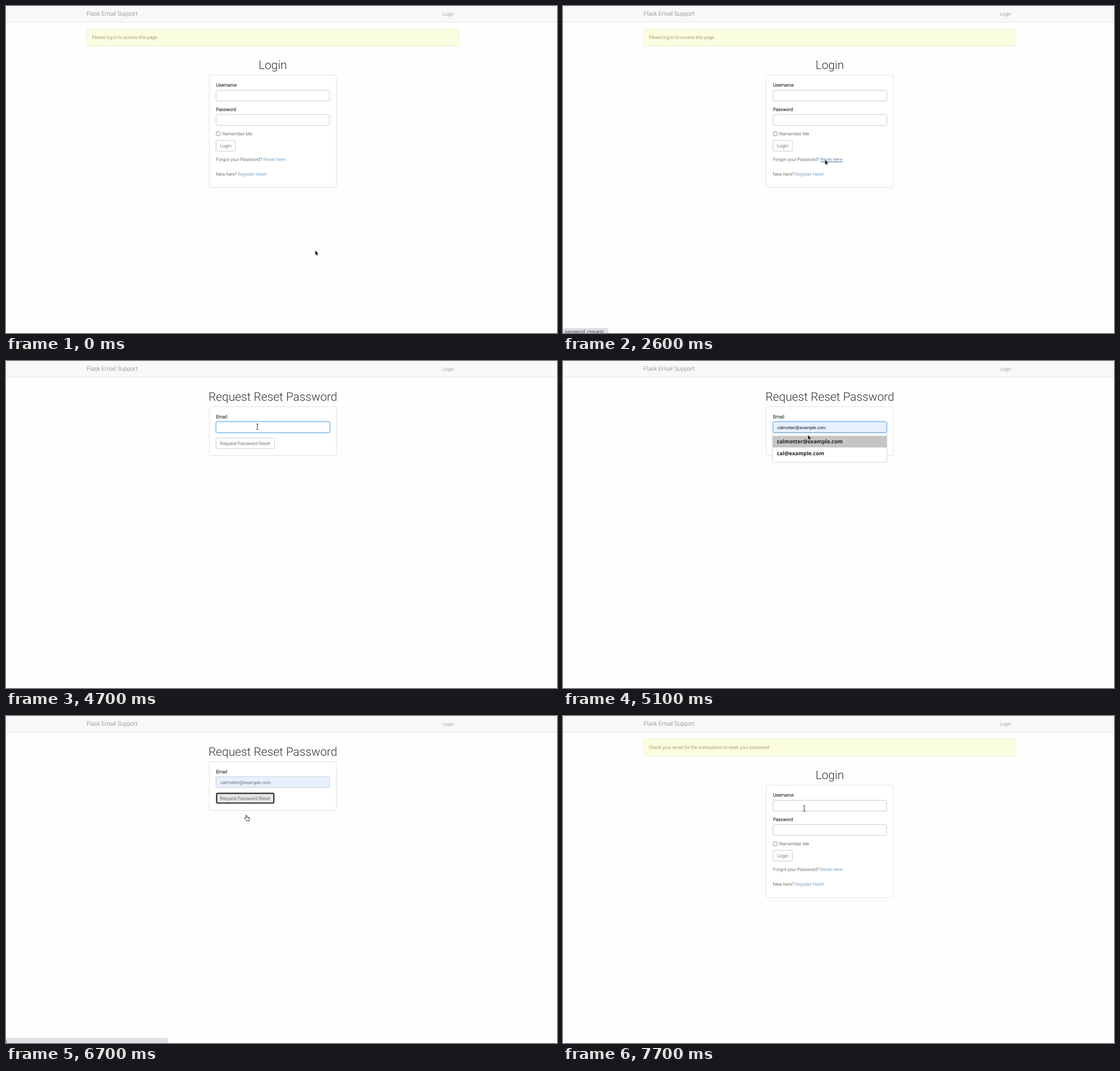
An HTML page that plays this animation: 972 px wide and 576 px high, repeating every 8000 ms.

```html
<!DOCTYPE html>
<html lang="en">
<head>
<meta charset="utf-8">
<title>Password reset</title>
<style>
html, body { margin: 0; width: 100%; height: 100%; overflow: hidden; background: #fefefe; }
svg { display: block; width: 972px; height: 576px; }
text { font: 300 8.08px Roboto, sans-serif; fill: #333; text-rendering: geometricPrecision; white-space: pre; }
.nav { fill: #777; }
.brand { font-size: 10.38px; }
.title { font-size: 20.76px; text-anchor: middle; }
.label { stroke: #333; stroke-width: .3px; }
.note { fill: #8a6d3b; }
.link { fill: #337ab7; }
.link.hover { fill: #23527c; text-decoration: underline; }
.mid { text-anchor: middle; }
.preview { font: 7.69px "Liberation Sans", Arial, sans-serif; fill: #111; }
.option { font: 600 9.3px "Noto Sans", sans-serif; fill: #222; }
.status { font: 8px "Noto Sans", sans-serif; fill: #3c4043; }
.panel { fill: #fff; stroke: #e2e2e2; }
.field, .button { fill: #fff; stroke: #ccc; }
.button.hover { fill: #e6e6e6; stroke: #adadad; }
.autofill { fill: #e8f0fe; }
.focus { stroke: #66afe9; filter: drop-shadow(0 0 1.7px rgba(102, 175, 233, .75)); }
.bar { fill: #dee1e6; }
.menu { fill: #fff; filter: drop-shadow(0 .7px 1px rgba(0, 0, 0, .4)); }
</style>
</head>
<body>
<svg viewBox="0 0 972 576">
  <rect width="972" height="28" fill="#f8f8f8"/>
  <path d="M0 28.5H972" stroke="#e7e7e7"/>
  <text class="nav brand" x="142" y="17.4">Flask Email Support</text>
  <text class="nav" x="770.8" y="17">Login</text>

  <g data-on="0-3000 6900-8000">
    <rect x="142.5" y="40.5" width="656.5" height="30" rx="2" fill="#fafde0" stroke="#f0f2cf"/>
    <text class="note" x="151.5" y="58.4" data-on="0-3000">Please log in to access this page.</text>
    <text class="note" x="151.5" y="58.4" data-on="6900-8000">Check your email for the instructions to reset your password</text>
    <text class="title" x="470.6" y="111.3">Login</text>
    <rect class="panel" x="358.5" y="122" width="224.3" height="197.8" rx="2"/>
    <text class="label" x="370.5" y="142.4">Username</text>
    <rect class="field" x="370.5" y="148.5" width="200.5" height="19" rx="2"/>
    <text class="label" x="370.5" y="185">Password</text>
    <rect class="field" x="370.5" y="191.2" width="200.5" height="19" rx="2"/>
    <rect x="371" y="221.7" width="6.8" height="6.8" rx="1.3" fill="#fff" stroke="#767676" stroke-width=".8"/>
    <text x="381.8" y="228">Remember Me</text>
    <rect class="button" x="370.5" y="236.5" width="34.2" height="19.2" rx="2"/>
    <text class="mid" x="387.6" y="249">Login</text>
    <text x="370.5" y="273.3">Forgot your Password? <tspan class="link" id="reset">Reset Here</tspan>.</text>
    <text x="370.5" y="299.2">New here? <tspan class="link">Register Here</tspan>!</text>
  </g>

  <g data-on="3000-6900">
    <text class="title" x="470.8" y="69.8">Request Reset Password</text>
    <rect class="panel" x="358.5" y="80.5" width="224.3" height="86" rx="2"/>
    <text class="label" x="370.5" y="100.9">Email</text>
    <rect class="field" id="email" x="370.5" y="107" width="200.5" height="19" rx="2"/>
    <rect class="button" id="submit" x="370.5" y="135.2" width="103" height="19" rx="2"/>
    <rect data-on="6300-6900" x="371.7" y="136.4" width="100.6" height="16.8" rx="1.5" fill="none" stroke="#101010" stroke-width="1.6"/>
    <text class="mid" x="422" y="147.6">Request Password Reset</text>
    <text class="preview" x="378" y="119.6" data-on="5100-5500">calmotter@example.com</text>
    <g data-on="5500-6900">
      <text id="typed" x="378" y="119.5">calmotter@example.com</text>
      <g data-on="5500-6300">
        <path id="spelling" stroke="#e03c3c" stroke-width=".9"/>
        <path id="caret" stroke="#111" stroke-width=".8"/>
      </g>
    </g>
    <g data-on="4800-5500">
      <rect class="menu" id="menu" x="370" y="127" width="201"/>
      <rect x="370" y="131.8" width="201" height="20.5" fill="#c4c4c4" data-on="5100-5500"/>
      <text class="option" x="377.3" y="145.3">calmotter@example.com</text>
      <text class="option" x="377.3" y="166">cal@example.com</text>
      <text class="option" x="377.3" y="186.6" data-on="4800-5100">dev@example.com</text>
    </g>
  </g>

  <g data-on="1900-3000">
    <path class="bar" d="M0 567H78q2 0 2 2V576H0z"/>
    <text class="status" x="3" y="576.3">password_request</text>
  </g>
  <g data-on="6400-6900">
    <path class="bar" d="M0 567H284q2 0 2 2V576H0z"/>
    <text class="status" x="-.5" y="576.6">l...</text>
  </g>

  <g id="cursor" stroke-linejoin="round">
    <path data-on="0-1900 2600-4000 4800-5700 6900-7700" fill="#111" stroke="#fff" stroke-width=".6"
      d="M0 0V9.2L2.1 7.3 3.5 10.6 5 10 3.6 6.8H6.5z"/>
    <path data-on="1900-2600 4000-4200 5700-6900" fill="#fff" stroke="#222" stroke-width=".9"
      d="M-1 1.3q1-1.4 2 0V4L4.6 4.6Q5.8 5 5.6 6.6L5 9V10.6H-.2V9.6L-3.5 6.3Q-3.5 4.8-2 5.4L-1 6.2zM2.6 4.4V6M4.2 4.7V6.2"/>
    <path data-on="4200-4800 7700-8000" fill="none" stroke="#222" stroke-width=".9"
      d="M-2-5Q0-5 0-4V4Q0 5-2 5M2-5Q0-5 0-4M0 4Q0 5 2 5"/>
  </g>
</svg>
<script>
const LOOP = 8000, STEP = 100;
const $ = id => document.getElementById(id);
const within = (t, from, to) => t >= from && t < to;

// Pointer path: time, x, y
const path = [
  [0, 545.3, 430], [700, 545.3, 430], [1400, 486.5, 287.5], [1500, 486.5, 287.5],
  [2000, 462, 270.5], [2900, 462, 270.5], [3700, 444.8, 154], [3800, 444.8, 153.3],
  [3900, 444.8, 153.3], [4000, 445, 136.3], [4100, 445, 136.3], [4300, 446, 113.3],
  [4600, 446, 113.3], [4900, 438, 121], [5000, 438, 121], [5100, 432, 130],
  [5400, 432, 130], [5900, 421, 150], [6000, 421, 150], [6100, 418, 158.5],
  [6600, 418, 158.5], [6700, 424, 174], [7400, 425.2, 198], [7500, 425.2, 198],
  [7700, 425.5, 163], [LOOP, 425.5, 163]
];

function pointerAt(t) {
  const i = path.findIndex(key => key[0] > t);
  const [t0, x0, y0] = path[i - 1], [t1, x1, y1] = path[i];
  const k = (t - t0) / (t1 - t0);
  return [x0 + (x1 - x0) * k, y0 + (y1 - y0) * k];
}

const timed = [...document.querySelectorAll("[data-on]")].map(el => ({
  el, spans: el.dataset.on.split(" ").map(span => span.split("-").map(Number))
}));

function draw(t) {
  for (const { el, spans } of timed)
    el.style.display = spans.some(span => within(t, ...span)) ? "" : "none";

  $("reset").classList.toggle("hover", within(t, 1900, 3000));
  $("submit").classList.toggle("hover", within(t, 4000, 4700) || within(t, 5700, 6900));
  $("email").classList.toggle("focus", within(t, 4700, 6300));
  $("email").classList.toggle("autofill", t >= 5100);
  $("menu").setAttribute("height", t < 5100 ? 71.5 : 51);

  if (within(t, 5500, 6300)) {
    const typed = $("typed"), name = typed.textContent.indexOf("@");
    $("spelling").setAttribute("d", `M378 120.8h${typed.getSubStringLength(0, name)}`);
    $("caret").setAttribute("d", `M${378.5 + typed.getComputedTextLength()} 112.3v8.6`);
  }
  $("cursor").setAttribute("transform", `translate(${pointerAt(t)})`);
}

const start = performance.now();
function tick() {
  const t = (performance.now() - start) % LOOP;
  draw(Math.floor(t / STEP) * STEP);
  requestAnimationFrame(tick);
}
tick();
</script>
</body>
</html>
```
